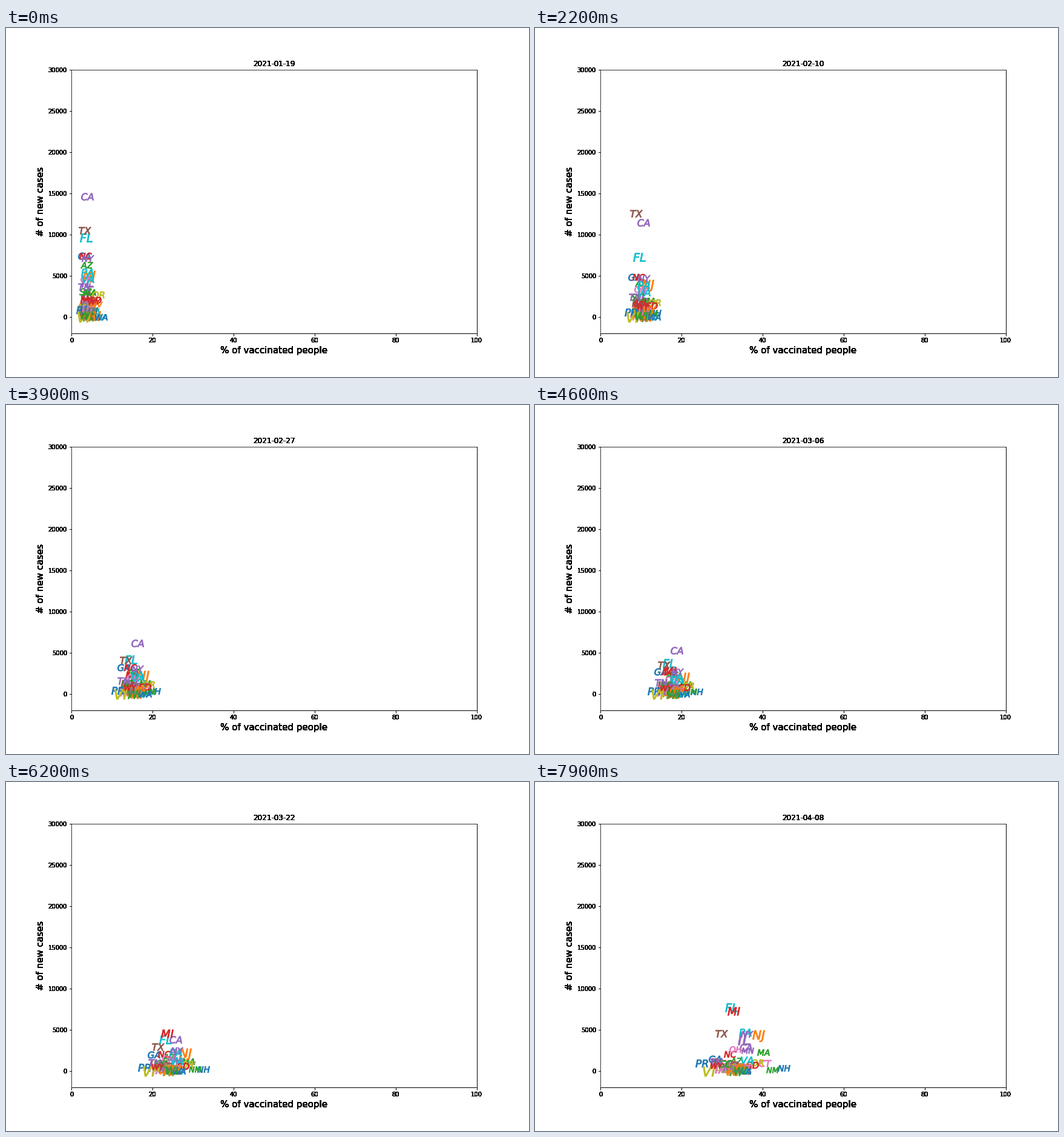
Write a matplotlib script that moves like this. It is 864 px wide and 576 px high and loops after 8000 ms.

```python
import numpy as np
import matplotlib.pyplot as plt
from matplotlib.animation import FuncAnimation

DAYS = 80
START = np.datetime64("2021-01-19")
ORDER = (
    "AL AK AZ AR CA CO CT DE DC FL GA GU HI ID IL IN IA KS KY LA ME MD MA MI "
    "MN MS MO MT NE NV NH NJ NM NC ND MP OH OK OR PA PR RI SC SD TN TX UT VT "
    "VI VA WA WV WI WY NY"
).split()

# Standouts: final share, winter cases, spring rise, January surge
STANDOUTS = {
    "CA": (35.8, 14300, 0, .4),
    "TX": (29.8, 9400, 2700, 1.9),
    "FL": (32.2, 9470, 5800, .3),
    "NY": (36.1, 7100, 3050),
    "GA": (28.3, 7400),
    "NC": (31.9, 7400, 550),
    "PA": (35.7, 5350, 3600, .2),
    "NJ": (39, 4800, 3300, .4),
    "MI": (32.8, 2000, 6900),
    "IL": (35.4, 4300, 3000),
    "VA": (36.2, 4600, 400),
    "OH": (33.3, 4600, 1700, .2),
    "SC": (30.7, 3000, 300, .4),
    "TN": (28.5, 3700, 350),
    "MA": (40.1, 3000, 1700),
    "CT": (40.6, 2400, 450),
    "MN": (36.3, 1600, 2200),
    "AZ": (33.5, 6300),
    "PR": (25, 900, 800),
    "NM": (42.4, 700),
    "NH": (45.3, 800, 200),
    "VI": (26.7, 0),
}

plt.rcParams["font.family"] = "DejaVu Sans"
rng = np.random.default_rng(19)
day = np.arange(DAYS)
progress = day / (DAYS - 1)
ROLLOUT = .75 * progress + .25 * progress ** 4
DECAY = 1 / (1 + (day / 33) ** 1.6)
SURGE = np.exp(-((day - 15) / 9) ** 2)


def track(share, winter, spring=0, surge=0, head=.11):
    """Daily positions: steady rollout, fading winter wave, spring rise."""
    x = share * (head + (1 - head) * ROLLOUT)
    # The larger the spring wave is against winter, the earlier it starts
    power = 10 / (1 + spring / max(winter, 1))
    y = winter * DECAY * (1 + surge * SURGE) + spring * progress ** power
    return np.column_stack([x, y])


def state_track(code):
    if code in STANDOUTS:
        return track(*STANDOUTS[code])
    size = rng.random() ** 2
    return track(
        share=rng.normal(33, 2.5),
        winter=3000 * size,
        spring=500 * size,
        head=rng.triangular(.08, .11, .22),
    )


def harden(artist, times):
    """Draw repeatedly so that soft edges turn solid."""
    draw = artist.draw

    def repeat(renderer):
        for _ in range(times):
            draw(renderer)

    artist.draw = repeat


fig, ax = plt.subplots(figsize=(12, 8), dpi=72)
fig.subplots_adjust(left=.125, right=.9, bottom=.125, top=.88)
ax.set(xlim=(0, 100), ylim=(-2000, 30000))
ax.set_xticks(range(0, 101, 20))
ax.set_yticks(range(0, 30001, 5000))
ax.set_xlabel("% of vaccinated people", fontsize=15)
ax.set_ylabel("# of new cases", fontsize=15)
title = ax.set_title(str(START), fontsize=12)

tracks = [state_track(code) for code in ORDER]
marks = [
    ax.scatter(*path[0], s=400, marker=f"${code}$", color=f"C{i % 10}")
    for i, (code, path) in enumerate(zip(ORDER, tracks))
]

# Everything outside the plot area has solid edges
ticks = [*ax.xaxis.get_major_ticks(), *ax.yaxis.get_major_ticks()]
for text in (title, ax.xaxis.label, ax.yaxis.label, *(t.label1 for t in ticks)):
    harden(text, 14)
for line in (ax.spines.right, ax.spines.bottom, *(t.tick1line for t in ticks)):
    harden(line, 4)


def update(i):
    title.set_text(str(START + i))
    for mark, path in zip(marks, tracks):
        mark.set_offsets(path[i])
    return [title, *marks]


anim = FuncAnimation(fig, update, frames=DAYS, interval=100, repeat=True)
plt.show()
```
